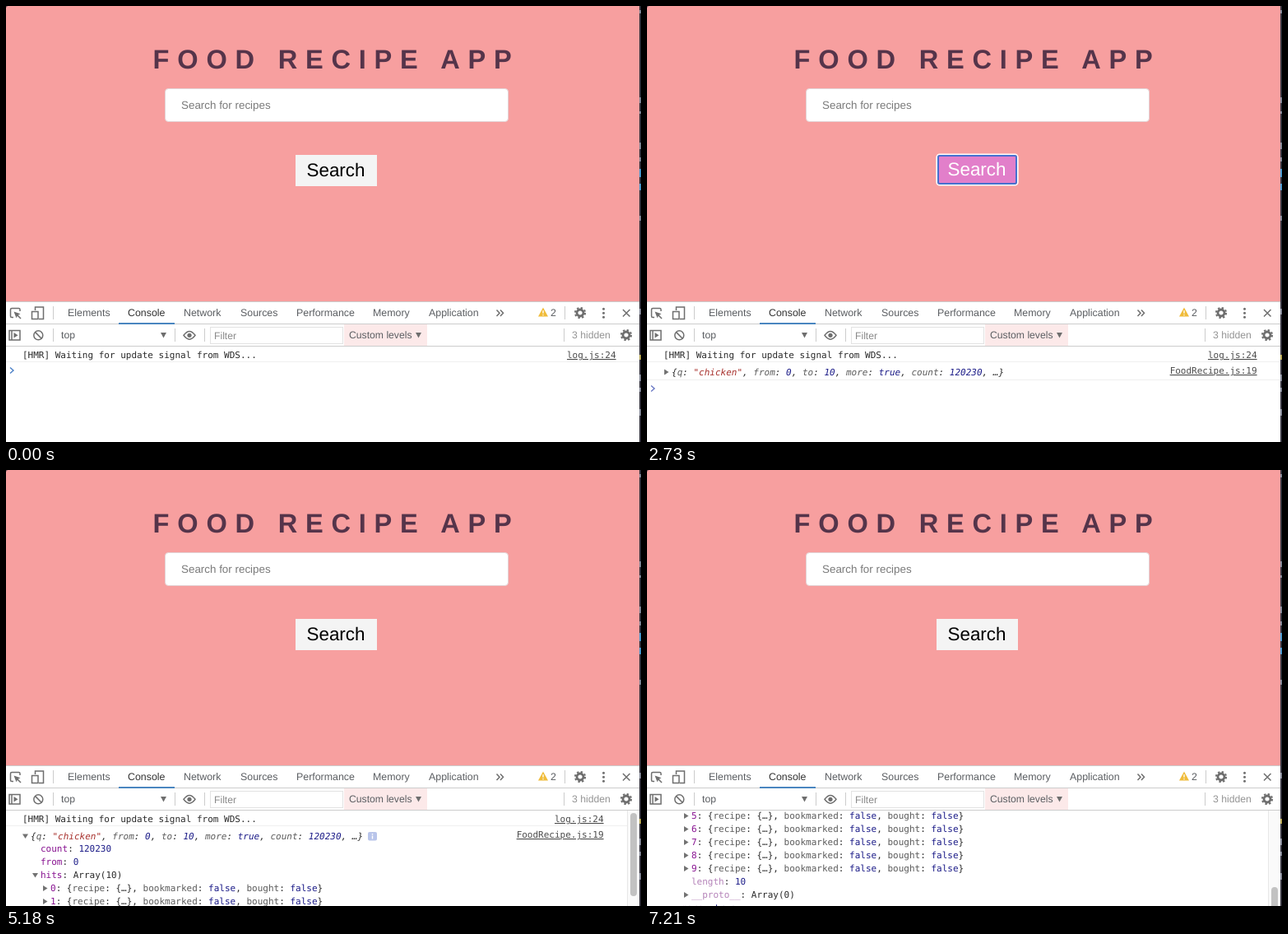
Animation of 772x530 px, one loop 7280 ms. Source, as an HTML page:

```html
<!DOCTYPE html>
<html lang="en">
<head>
<meta charset="utf-8">
<title>Food recipe app</title>
<style>
html, body { margin: 0; width: 100%; height: 100%; overflow: hidden; background: #fff; }
svg { display: block; width: 772px; height: 530px; }
text { white-space: pre; text-rendering: geometricPrecision; font-family: "Liberation Sans", Arial, sans-serif; }
.tabs text { font-size: 12.4px; fill: #5b5e62; }
.tools text { font-size: 12.2px; fill: #5b5e62; }
.big { font-size: 22.4px; }
.icon { fill: none; stroke: #6e6e6e; stroke-width: 1.5; }
.rule { stroke: #ccc; fill: none; }
.log text { font: 11px "DejaVu Sans Mono", monospace; fill: #2a2a2a; }
.log .preview { font-style: italic; }
.log .link { fill: #4c4c4c; text-decoration: underline; text-anchor: end; }
.key { fill: #881391; }
.dim { fill: #b583b9; }
.sub { fill: #5c5c5c; }
.num { fill: #1c1c88; }
.str { fill: #a8322e; }
.arrow { fill: #727272; }
.prompt { fill: none; stroke: #4a7fc6; stroke-width: 1.4; }

/* one 7280 ms cycle, hard cuts */
.plain, .pink, .pinkRing, .ring, .empty, .result, .folded, .open, .short, .long, .links, .scroll, .thumb {
  animation: 7280ms step-end infinite;
}
.plain { animation-name: plain; }
.pink { animation-name: pink; }
.pinkRing { animation-name: pinkRing; }
.ring { animation-name: ring; }
.empty { animation-name: empty; }
.result { animation-name: result; }
.folded { animation-name: folded; }
.open { animation-name: open; }
.short { animation-name: short; }
.long { animation-name: long; }
.links { animation-name: links; }
.scroll { --k: -1; animation-name: scroll; }
.thumb { --k: .536; animation-name: scroll; }
@keyframes plain { 0%, 40.3% { visibility: visible } 24.9% { visibility: hidden } 100% { visibility: visible } }
@keyframes pink { 0%, 40.3%, 100% { visibility: hidden } 24.9% { visibility: visible } }
@keyframes pinkRing { 0%, 40.3%, 100% { visibility: hidden } 29.7% { visibility: visible } }
@keyframes ring { 0%, 51.8%, 100% { visibility: hidden } 40.3% { visibility: visible } }
@keyframes empty { 0% { visibility: visible } 37.4%, 100% { visibility: hidden } }
@keyframes result { 0% { visibility: hidden } 37.4%, 100% { visibility: visible } }
@keyframes folded { 0%, 51.8%, 100% { visibility: hidden } 37.4% { visibility: visible } }
@keyframes open { 0% { visibility: hidden } 51.8%, 100% { visibility: visible } }
@keyframes short { 0%, 70.1%, 100% { visibility: hidden } 51.8% { visibility: visible } }
@keyframes long { 0% { visibility: hidden } 70.1%, 100% { visibility: visible } }
@keyframes links { 0% { transform: none } 70.1%, 100% { transform: translateX(-15px) } }
@keyframes scroll {
  0% { transform: none }
  80.7% { transform: translateY(calc(var(--k) * 56px)) }
  81.6% { transform: translateY(calc(var(--k) * 127px)) }
  82.6% { transform: translateY(calc(var(--k) * 156px)) }
  83.55%, 100% { transform: translateY(calc(var(--k) * 168px)) }
}
</style>
</head>
<body>
<svg viewBox="0 0 772 530" xmlns="http://www.w3.org/2000/svg">
  <defs>
    <clipPath id="pane"><rect y="414" width="770" height="116"/></clipPath>
    <g id="gear" fill="none" stroke="#6e6e6e">
      <circle r="4" stroke-width="2.8"/>
      <circle r="6.1" stroke-width="2" stroke-dasharray="2.4 2.39"/>
    </g>
  </defs>

  <!-- page -->
  <rect width="772" height="360" fill="#f79f9f"/>
  <path d="M0 0h2l-2 2z" fill="#7a5560"/>
  <text x="178.6" y="75.5" font-size="32.6" font-weight="700" letter-spacing="9.78" fill="#55344a">FOOD RECIPE APP</text>
  <rect x="193.5" y="100.5" width="417" height="40" rx="4" fill="#fff" stroke="#e3d3d5"/>
  <text x="213" y="125" font-size="13.4" fill="#7a7a7a">Search for recipes</text>
  <g class="plain">
    <rect x="352" y="181" width="99" height="38" fill="#f4f4f4"/>
    <text class="big" x="365.5" y="207">Search</text>
  </g>
  <g class="ring" fill="none">
    <rect x="351" y="180" width="101" height="40" rx="3.5" stroke="#fff" stroke-width="1.5"/>
    <rect x="352.8" y="181.8" width="97.4" height="36.4" rx="2" stroke="#3a74b0" stroke-width="2"/>
  </g>
  <g class="pink">
    <rect x="354" y="182" width="95" height="34" fill="#e27fca"/>
    <text class="big" x="365.5" y="206" fill="#fff">Search</text>
  </g>
  <g class="pinkRing" fill="none">
    <rect x="352.2" y="180.2" width="98.6" height="37.6" rx="3.5" stroke="#fff" stroke-width="1.6"/>
    <rect x="354" y="182" width="95" height="34" rx="2" stroke="#4670cf" stroke-width="2"/>
  </g>

  <!-- developer tools -->
  <rect y="359.5" width="772" height="171" fill="#fff"/>
  <path class="rule" d="M0 359.5H770M0 386.5H770M0 413.5H770"/>
  <path class="rule" d="M57.5 365v16M679.5 365v16M57.5 392v16M205.5 392v16M241.5 392v16M678.5 392v16"/>
  <g class="tabs">
    <path class="icon" d="M9 378.5H7Q5.5 378.5 5.5 377V369Q5.5 367.5 7 367.5H15.5Q17 367.5 17 369V371M13.5 375.5L18 380"/>
    <path d="M9.5 371.5l8 2.8-3.3 1.7-1.7 3.3z" fill="#6e6e6e"/>
    <path class="icon" d="M35.5 370V366H45.5V380.5H40M31.5 371.5h7.5v9h-7.5z"/>
    <text x="75" y="377">Elements</text>
    <text x="148" y="377" style="fill:#333">Console</text>
    <text x="216" y="377">Network</text>
    <text x="285" y="377">Sources</text>
    <text x="353" y="377">Performance</text>
    <text x="446" y="377">Memory</text>
    <text x="514" y="377">Application</text>
    <path d="M137 386h68" stroke="#4a86c0" stroke-width="2"/>
    <path class="icon" d="M596.5 369.5l3.5 3.8-3.5 3.8M601 369.5l3.5 3.8-3.5 3.8"/>
    <path d="M653 366.5l6 11h-12z" fill="#f0bc3a"/>
    <path d="M653 370v3.8M653 375v1.3" stroke="#fff" stroke-width="1.3"/>
    <text x="662" y="377">2</text>
    <use href="#gear" x="698" y="373"/>
    <g fill="#6e6e6e"><circle cx="726.5" cy="368.3" r="1.5"/><circle cx="726.5" cy="373.3" r="1.5"/><circle cx="726.5" cy="378.3" r="1.5"/></g>
    <path class="icon" d="M750 369l8.5 8.5M758.5 369L750 377.5"/>
  </g>
  <g class="tools">
    <rect x="411" y="387" width="101" height="26" fill="#fce9e9"/>
    <path class="icon" d="M4 394.5h13v11.5H4zM7 394.5v11.5" stroke-width="1.2"/>
    <path d="M9.5 397l5 3.3-5 3.3z" fill="#6e6e6e"/>
    <circle class="icon" cx="39.3" cy="400.3" r="5.5"/>
    <path class="icon" d="M35.4 396.4l7.8 7.8"/>
    <text x="67" y="404">top</text>
    <path d="M188 397h7l-3.5 6.5zM498 397h7l-3.5 6.5z" fill="#6e6e6e"/>
    <path class="icon" d="M216 400.3Q223 390.5 230 400.3Q223 410 216 400.3z"/>
    <circle cx="223" cy="400.3" r="2.6" fill="#6e6e6e"/>
    <rect x="248.5" y="390.5" width="161" height="20" fill="#fff" stroke="#e2e2e2"/>
    <text x="253" y="405" style="fill:#8a8a8a">Filter</text>
    <text x="417" y="404">Custom levels</text>
    <text x="688" y="404" style="fill:#949494">3 hidden</text>
    <use href="#gear" x="754" y="400"/>
  </g>

  <g class="log" clip-path="url(#pane)">
    <g class="scroll">
      <text x="20" y="428">[HMR] Waiting for update signal from WDS...</text>
      <path d="M0 432.5H770" stroke="#efefef"/>
      <path class="prompt empty" d="M5 439.5l4 3.5-4 3.5"/>
      <g class="links">
        <text class="link" x="741.6" y="428">log.js:24</text>
        <text class="link result" x="741.6" y="447">FoodRecipe.js:19</text>
      </g>
      <g class="result" id="result"></g>
      <g class="folded" id="folded">
        <path d="M0 454.5H770" stroke="#efefef"/>
        <path class="prompt" d="M5 461.5l4 3.5-4 3.5" style="stroke:#6a78c4"/>
      </g>
      <g class="open" id="open">
        <rect x="440" y="440" width="11" height="10.5" rx="2" fill="#b9c5ea"/>
        <path d="M445.5 442v1.4M445.5 444.4v4.2" stroke="#fff" stroke-width="1.4"/>
      </g>
      <g class="short" id="short"></g>
      <g class="long" id="long"></g>
    </g>
    <g class="long">
      <rect x="755" y="414" width="15" height="116" fill="#fafafa"/>
      <path d="M755.5 414V530" stroke="#e7e7e7"/>
      <rect class="thumb" x="759" y="417" width="8" height="101" rx="4" fill="#c2c2c2"/>
    </g>
  </g>

  <!-- sliver of the window behind -->
  <rect x="770" width="2" height="530" fill="#33323c"/>
  <path d="M771 5v4M771 111v7M771 128v3M771 166v8M771 184v5M771 255v6M771 368v7M771 448v8M771 464v5M771 490v8" stroke="#858998" stroke-width="2"/>
  <path d="M771 198v10M771 216v8" stroke="#4d9bd0" stroke-width="2"/>
  <path d="M771 424v6" stroke="#b9a955" stroke-width="2"/>
</svg>
<script>
const span = (cls, s) => `<tspan class="${cls}">${s}</tspan>`;

// colours keys, strings, numbers and booleans; `first` is the class of the leading key
function tint(line, first) {
  let cls = first;
  return line.replace(/Array\(\d+\)|\(\d+\)|"\w+"|\w+(?=:)|\b(?:\d+|true|false)\b/g, s => {
    if (s[0] === 'A') return s;
    if (s[0] === '(') return span('sub', s);
    if (s[0] === '"') return span('str', s);
    if (/^(\d+|true|false)$/.test(s) && cls === 'sub') return span(first === 'sub' || !/^$/.test(s) ? 'num' : cls, s);
    const out = span(cls, s);
    cls = 'sub';
    return out;
  });
}

const add = (id, html) => document.getElementById(id).insertAdjacentHTML('beforeend', html);
const right = (x, y) => `<path class="arrow" d="M${x} ${y - 3.5}l5.5 3.5-5.5 3.5z"/>`;
const down = (x, y) => `<path class="arrow" d="M${x} ${y - 2.5}h7l-3.5 5.5z"/>`;
const row = (id, x, y, line, first = 'key', cls = '') =>
  add(id, `<text class="${cls}" x="${x}" y="${y + 4}">${tint(line, first)}</text>`);

row('result', 30, 445, '{q: "chicken", from: 0, to: 10, more: true, count: 120230, …}', 'sub', 'preview');
add('folded', right(21, 445));
add('open', down(20, 445));
row('open', 42, 460, 'count: 120230');
row('open', 42, 476, 'from: 0');

add('short', right(33, 492.5));
row('short', 42, 492, `hits: (10) [${Array(10).fill('{…}').join(', ')}]`);
row('short', 42, 508, 'more: true');
row('short', 42, 524, 'q: "chicken"');

add('long', down(32, 492.5));
row('long', 42, 492, 'hits: Array(10)');
for (let i = 0; i < 10; i++) {
  const y = 508 + 16 * i;
  add('long', right(45, y + .5));
  row('long', 54, y, `${i}: {recipe: {…}, bookmarked: false, bought: false}`);
}
row('long', 54, 668, 'length: 10', 'dim');
add('long', right(45, 684.5));
row('long', 54, 684, '__proto__: Array(0)', 'dim');
row('long', 42, 700, 'more: true');
row('long', 42, 716, 'q: "chicken"');
</script>
</body>
</html>
```
